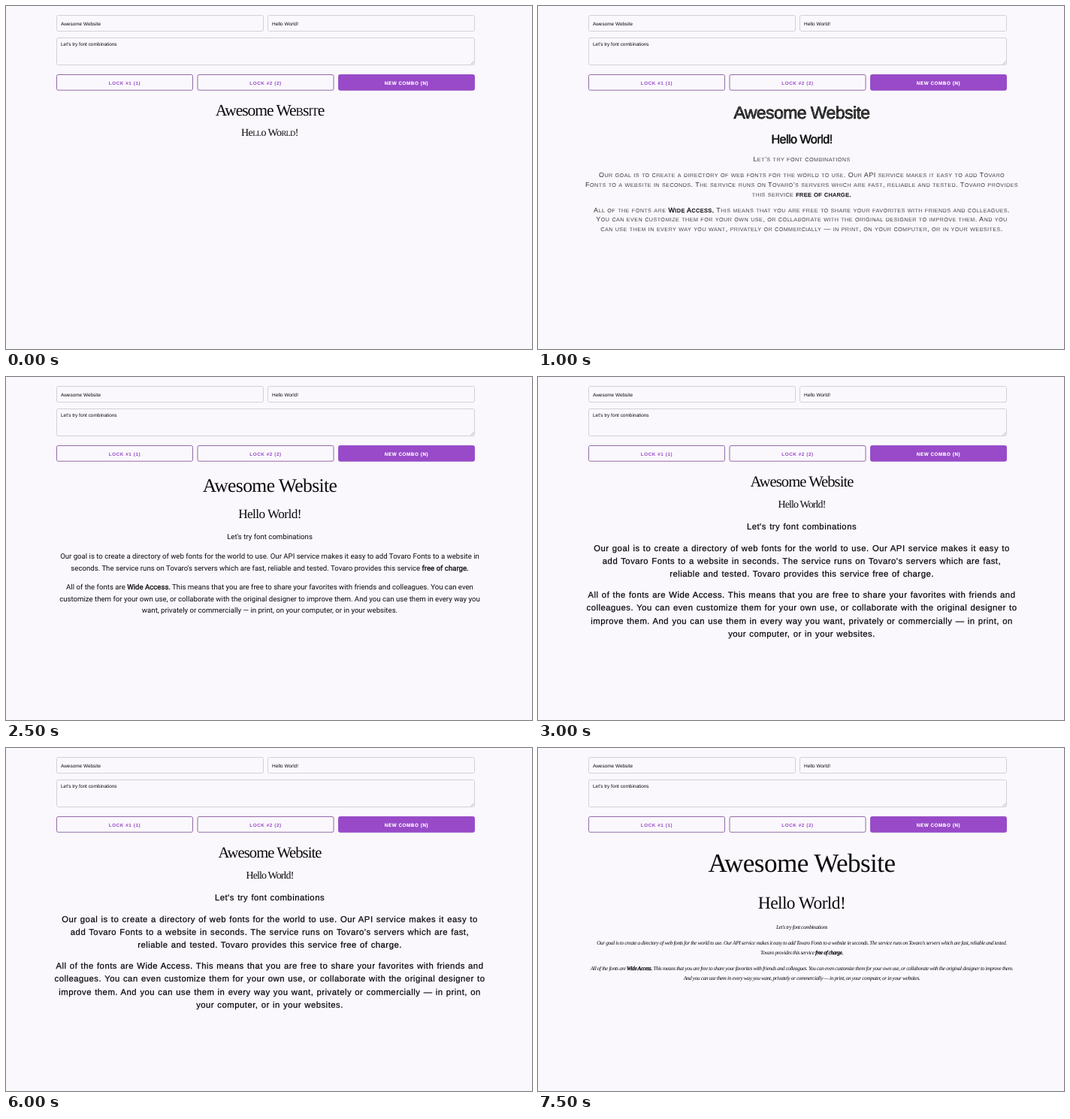
An HTML page that plays this animation: 700 px wide and 457 px high, repeating every 8 s.

```html
<!DOCTYPE html>
<html lang="en">
<head>
<meta charset="utf-8">
<title>Font combinations</title>
<style>
  html, body { margin: 0; width: 100%; height: 100%; overflow: hidden; background: #faf8fc; }
  svg { display: block; width: 700px; height: 457px; }
  text { text-rendering: geometricPrecision; fill: #0c0a0e; }

  .form rect { fill: none; stroke: #cfcdd2; stroke-width: .9; }
  .form text { font: 6.45px "Liberation Sans", Arial, sans-serif; }
  .form .lock { stroke: #8a5a9f; }
  .form .new { fill: #984ac8; stroke: #984ac8; }
  .form .label { font-weight: 700; font-size: 6.3px; letter-spacing: .57px; text-anchor: middle; fill: #9647c8; }
  .form .on { fill: #fff; stroke: #fff; stroke-width: .15; }
  .grip { stroke: #8c8a90; stroke-width: .6; }

  .combo, .late { opacity: 0; }
  .combo text { text-anchor: middle; }
  .serif { font-family: "Liberation Serif", "Times New Roman", serif; }
  .sans { font-family: "Liberation Sans", Arial, sans-serif; }
  .neutral { font-family: Roboto, Arial, sans-serif; }
  .script { font-family: "Liberation Serif", "Times New Roman", serif; font-style: italic; }
  .ink { stroke: #0c0a0e; stroke-width: .15; }
  .thin { stroke: #faf8fc; stroke-width: .16; }
  .round { stroke: #0c0a0e; stroke-width: .25; stroke-linejoin: round; word-spacing: .6px; }
  .sketch { fill: url(#hatch); stroke: #111; stroke-width: .7; }
  .heavy { stroke: #111; stroke-width: .5; }
  .strong { stroke: #0c0a0e; stroke-width: .3; }

  .combo, .late { animation: 8s step-end infinite; }
  #c0 { animation-name: first; }
  #c0 .late { animation-name: body; }
  #c1 { animation-name: second; }
  #c2 { animation-name: third; }
  #c3 { animation-name: fourth; }
  #c4 { animation-name: fifth; }
  @keyframes first { 0% { opacity: 1 } 12.5%, 100% { opacity: 0 } }
  @keyframes body { 0% { opacity: 0 } 6.25%, 100% { opacity: 1 } }
  @keyframes second { 0% { opacity: 0 } 12.5% { opacity: 1 } 25%, 100% { opacity: 0 } }
  @keyframes third { 0% { opacity: 0 } 25% { opacity: 1 } 37.5%, 100% { opacity: 0 } }
  @keyframes fourth { 0% { opacity: 0 } 37.5% { opacity: 1 } 81.25%, 100% { opacity: 0 } }
  @keyframes fifth { 0% { opacity: 0 } 81.25%, 100% { opacity: 1 } }
</style>
</head>
<body>
<svg viewBox="0 0 700 457">
  <defs>
    <pattern id="hatch" width="3.4" height="9" patternUnits="userSpaceOnUse" patternTransform="rotate(38)">
      <rect width="3.4" height="9" fill="#111"/>
      <path d="M1 0V6M2.6 3V9" stroke="#faf8fc" stroke-width=".5"/>
    </pattern>
  </defs>
  <g class="form">
    <rect x="67.5" y="12.5" width="275" height="21" rx="2"/>
    <rect x="348.5" y="12.5" width="275" height="21" rx="2"/>
    <rect x="67.5" y="42.5" width="556" height="36" rx="2"/>
    <path class="grip" d="M618.5 77.5l4-4M620.8 77.5l1.8-1.8"/>
    <text x="73" y="25.5">Awesome Website</text>
    <text x="354" y="25.5">Hello World!</text>
    <text x="73" y="52.5">Let's try font combinations</text>
    <rect class="lock" x="67.5" y="91.5" width="181" height="20.7" rx="2"/>
    <rect class="lock" x="255" y="91.5" width="181" height="20.7" rx="2"/>
    <rect class="new" x="442.5" y="91.5" width="181" height="20.7" rx="2"/>
    <text class="label" x="158" y="104.5">LOCK #1 (1)</text>
    <text class="label" x="345.5" y="104.5">LOCK #2 (2)</text>
    <text class="label on" x="533" y="104.5">NEW COMBO (N)</text>
  </g>
  <g id="stage"></g>
</svg>
<script>
const LEAD = "Let's try font combinations";
const PARAS = [
  "Our goal is to create a directory of web fonts for the world to use. Our API service makes it easy to add Tovaro Fonts to a website in seconds. The service runs on Tovaro's servers which are fast, reliable and tested. Tovaro provides this service *free *of *charge.",
  "All of the fonts are *Wide *Access. This means that you are free to share your favorites with friends and colleagues. You can even customize them for your own use, or collaborate with the original designer to improve them. And you can use them in every way you want, privately or commercially — in print, on your computer, or in your websites."
];

// Heads: [class, size, spacing, baseline]. Body tops are baselines of lead and paragraphs.
// Ends give the word count reached at each line break.
const COMBOS = [
  { title: ["serif", 21.5, -1.02, 146], sub: ["serif", 14, -.59, 172.7], headCaps: [/[bitlrd]/g, .72],
    body: ["serif ink", 11.2, 0], tops: [201, 229.7, 292.2], lead: 17.1, ends: [[27, 47], [23, 45]], curly: true },
  { title: ["sans sketch", 23, -.56, 149.7], sub: ["sans heavy", 16.2, -.56, 182.7],
    body: ["sans thin", 9, .44], bodyCaps: [/[a-z]+/g, .8], tops: [207.3, 228.3, 274.5], lead: 12.6,
    ends: [[24, 44], [21, 41]], curly: true },
  { title: ["serif", 25.5, -.56, 152.5], sub: ["serif", 17.2, -.56, 187.5],
    body: ["neutral", 9.65, 0], tops: [216.3, 242.2, 283.2], lead: 15.4, ends: [[29], [24, 48]] },
  { title: ["serif", 20.6, -.95, 146], sub: ["serif", 13.9, -.85, 173.8],
    body: ["sans round", 11.3, .5], tops: [203.3, 231.8, 294.3], lead: 17.1, ends: [[22, 39], [20, 37, 56]] },
  { title: ["serif", 35.1, -.56, 164.7], sub: ["serif", 23.4, -.56, 213.7],
    body: ["script", 7.4, -.4], tops: [241.3, 262.4, 296], lead: 12.6, ends: [[42], [39]] }
];

const line = (text, [cls, size, gap], y) =>
  `<text class="${cls}" x="351" y="${y}" font-size="${size}" letter-spacing="${gap}">${text}</text>`;

const smallCaps = (text, caps) => caps
  ? text.replace(caps[0], s => `<tspan font-size="${caps[1]}em">${s.toUpperCase()}</tspan>`)
  : text;

function styleWord(word, combo) {
  const text = smallCaps(word.replace("*", "").replace("'", combo.curly ? "’" : "'"), combo.bodyCaps);
  return word[0] === "*" ? `<tspan class="strong">${text}</tspan>` : text;
}

function bodyLine(words, combo, y) {
  return line(words.map(w => styleWord(w, combo)).join(" "), combo.body, y);
}

function paragraph(text, combo, i) {
  const words = text.split(" ");
  const stops = [0, ...combo.ends[i], words.length];
  return stops.slice(1).map((end, n) =>
    bodyLine(words.slice(stops[n], end), combo, combo.tops[i + 1] + n * combo.lead)).join("");
}

function comboMarkup(combo, i) {
  const head = (text, style) => line(smallCaps(text, combo.headCaps), style, style[3]);
  return `<g class="combo" id="c${i}">
    ${head("Awesome Website", combo.title)}${head("Hello World!", combo.sub)}
    <g${i ? "" : ' class="late"'}>
      ${bodyLine(LEAD.split(" "), combo, combo.tops[0])}
      ${PARAS.map((p, n) => paragraph(p, combo, n)).join("")}
    </g></g>`;
}

document.getElementById("stage").innerHTML = COMBOS.map(comboMarkup).join("");
</script>
</body>
</html>
```
